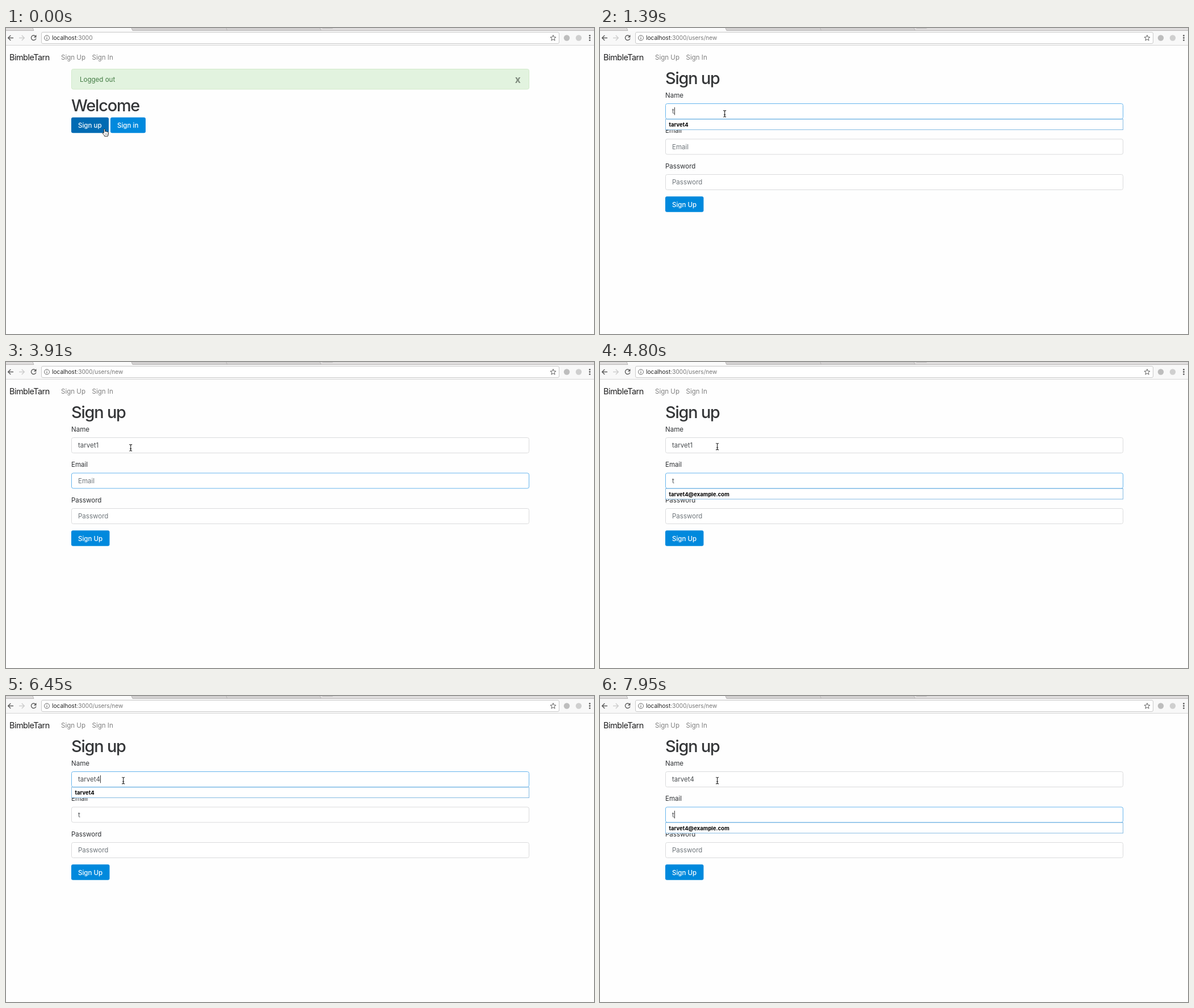
An HTML page that plays this animation: 1036 px wide and 540 px high, repeating every 8 s.

```html
<!DOCTYPE html>
<html lang="en">
<head>
<meta charset="utf-8">
<title>Sign up</title>
<style>
html, body { margin: 0; width: 100%; height: 100%; overflow: hidden; background: #fefefe; }
svg { display: block; width: 100vw; height: 100vh; }
text { font: 11.55px Inter, "Open Sans", sans-serif; fill: #2f3235; white-space: pre; }
.brand { font-size: 14.45px; letter-spacing: -.5px; fill: #1d1d1e; }
.nav { fill: #808080; }
.title { font-size: 28.9px; font-weight: 500; letter-spacing: -1.2px; fill: #343638; }
.btn { font-weight: 500; fill: #fff; }
.url { font-size: 10.15px; fill: #222; }
.path { fill: #777; }
.value { fill: #4a4e51; }
.hint { fill: #70777c; }
.option { font-size: 9.5px; font-weight: 700; fill: #000; }
.alert { fill: #417a42; }
.close { font-size: 17.3px; font-weight: 700; fill: #7f8b7e; }
</style>
</head>
<body>
<svg id="stage" viewBox="0 0 1036 540" preserveAspectRatio="none"></svg>
<script>
const NS = 'http://www.w3.org/2000/svg';
const stage = document.getElementById('stage');
const LOOP = 8000;

function add(parent, tag, attrs, content) {
  const el = document.createElementNS(NS, tag);
  for (const key in attrs) el.setAttribute(key, attrs[key]);
  if (content) el.textContent = content;
  parent.appendChild(el);
  return el;
}
const group = parent => add(parent, 'g', {});
const rect = (parent, x, y, width, height, fill, more) =>
  add(parent, 'rect', { x, y, width, height, fill, ...more });
const text = (parent, x, y, content, cls = '') =>
  add(parent, 'text', { x, y, class: cls }, content);
const stroke = (parent, d, color, width = 1.4) =>
  add(parent, 'path', { d, fill: 'none', stroke: color, 'stroke-width': width });
const dot = (parent, cx, cy, r, fill) => add(parent, 'circle', { cx, cy, r, fill });
const show = (el, on) => el.setAttribute('display', on ? 'inline' : 'none');

function button(parent, x, y, width, label, fill) {
  rect(parent, x, y, width, 27.5, fill, { rx: 3 });
  text(parent, x + 12, y + 18.3, label, 'btn');
}

// Browser bar
rect(stage, 0, 0, 1036, 540, '#fefefe');
rect(stage, 0, 0, 1036, 4, '#dfdddd');
add(stage, 'path', { d: 'M47 0H221L223 5H49Z', fill: '#fbfbfb' });
add(stage, 'path', { d: 'M221 0H553L555 4H223Z', fill: '#d2d0d0' });
stroke(stage, 'M0 4.5H49L47 0M221 0L223 4.5H1036M388 0L389.5 4M553 0L555 4', '#b9b7b7', 1);
rect(stage, 557, 0, 19, 1.2, '#c4c2c2', { rx: 1 });
rect(stage, 0, 5, 1036, 25, '#f8f8f8');
rect(stage, 0, 30, 1036, 1, '#d6d6d6');
rect(stage, 62.5, 7.5, 912, 20, '#fff', { rx: 2.5, stroke: '#c9c9c9' });
stroke(stage, 'M13 17.5H4M8.2 13L3.7 17.5L8.2 22', '#5c5c5c');
stroke(stage, 'M23 17.5H32M27.8 13L32.3 17.5L27.8 22', '#cdcdcd');
stroke(stage, 'M52 14.4A4.3 4.3 0 1 0 52.9 18.4', '#5c5c5c');
add(stage, 'path', { d: 'M53.5 12V16.7H48.8Z', fill: '#5c5c5c' });
add(stage, 'circle', { cx: 72, cy: 17.5, r: 4.5, fill: 'none', stroke: '#666', 'stroke-width': 1 });
stroke(stage, 'M72 16.8V20M72 14.7V15.8', '#666', 1.1);
const url = text(stage, 81, 21.2, 'localhost', 'url');
const path = add(url, 'tspan', { class: 'path' });
const star = Array.from({ length: 10 }, (_, i) => {
  const r = i % 2 ? 2.3 : 5.3, a = i * Math.PI / 5;
  return `${964 + r * Math.sin(a)} ${17.8 - r * Math.cos(a)}`;
});
stroke(stage, `M${star.join('L')}Z`, '#5f5f5f', 1);
dot(stage, 988, 17.5, 5.2, '#bdbdbd');
dot(stage, 1009, 17.5, 5.2, '#cfcfcf');
for (const y of [13.4, 17.5, 21.6]) dot(stage, 1028.5, y, 1.4, '#5a5a5a');

// Site header
text(stage, 6, 56.5, 'BimbleTarn', 'brand');
text(stage, 97, 56, 'Sign Up', 'nav');
text(stage, 151.5, 56, 'Sign In', 'nav');

// Welcome page
const welcome = group(stage);
rect(welcome, 115.5, 72.5, 806, 35.5, '#e2f3df', { rx: 3, stroke: '#d2eacb' });
text(welcome, 130, 94.5, 'Logged out', 'alert');
text(welcome, 896.8, 97, 'x', 'close');
text(welcome, 115, 147, 'Welcome', 'title');
button(welcome, 115, 157.8, 66, 'Sign up', '#006bb3');
button(welcome, 184, 157.8, 62, 'Sign in', '#0089dd');

// Sign-up form
const form = group(stage);
text(form, 115, 99, 'Sign up', 'title');
button(form, 115, 297.3, 67.5, 'Sign Up', '#0089dd');

function field(label, hint, y, option) {
  text(form, 115, y - 10.2, label);
  const box = rect(form, 115.5, y + .5, 806, 27, '#fff', { rx: 3 });
  const mark = rect(form, 127, y + 6.5, 0, 14.5, '#b3d7fe');
  const value = text(form, 127, y + 18, '');
  const caret = rect(form, 127, y + 7, 1, 13.5, '#333');
  let list;
  return {
    addList() {
      list = group(form);
      rect(list, 115.5, y + 28, 806, 18.5, '#fff', { stroke: '#86bbe2' });
      text(list, 121.5, y + 41.2, option, 'option');
    },
    draw(content, focus, caretOn, selected, open) {
      value.textContent = content || hint;
      value.setAttribute('class', content ? 'value' : 'hint');
      const width = content ? value.getComputedTextLength() : 0;
      box.setAttribute('stroke', ['#dadbdc', '#9cc8ec', '#66b5ee'][focus]);
      mark.setAttribute('width', selected ? width : 0);
      caret.setAttribute('x', 127 + Math.round(width));
      show(caret, caretOn);
      if (list) show(list, open);
    }
  };
}
const fields = [
  field('Name', 'User name', 133, 'tarvet4'),
  field('Email', 'Email', 195.5, 'tarvet4@example.com'),
  field('Password', 'Password', 258)
];
fields[0].addList();
fields[1].addList();

// Mouse pointers, each with its hot spot at 0,0
const pointers = { hand: group(stage), arrow: group(stage), beam: group(stage) };
add(pointers.hand, 'path', {
  d: 'M-1.2 .8C-1.2 -.6 1 -.6 1 .8V4.2C1.5 3.5 3 3.7 3.1 4.7C3.8 4 5 4.4 5.1 5.3C6 4.8 7 5.3 7 6.4V8.6C7 10.3 6 10.8 5.8 12.5H.2C0 10.8 -2.2 9.3 -3.2 7.3C-3.8 6 -2.4 5.5 -1.2 7Z',
  fill: '#fff', stroke: '#222', 'stroke-width': 1
});
stroke(pointers.hand, 'M1.4 7.5V10M3.3 7.5V10M5 7.5V10', '#444', .6);
add(pointers.arrow, 'path', {
  d: 'M0 0V10.2L2.3 8.1L4 12L5.9 11.2L4.2 7.4H7.3Z',
  fill: '#111', stroke: '#fff', 'stroke-width': .8
});
const beam = 'M-2.5 -5.7Q0 -5.7 0 -4.2Q0 -5.7 2.5 -5.7M0 -4.5V4.5M-2.5 5.7Q0 5.7 0 4.2Q0 5.7 2.5 5.7M-1.5 1.8H1.5';
stroke(pointers.beam, beam, '#fff', 2.2);
stroke(pointers.beam, beam, '#222', 1.1);

// Each step changes only the listed parts of the state.
const steps = [
  [0, { page: 'welcome', mouse: ['hand', 173.5, 178.5], name: '', email: '', active: -1, focus: 0, caret: false, selected: false, open: false }],
  [140, { page: 'form' }],
  [350, { mouse: ['arrow', 174, 178] }],
  [500, { mouse: ['arrow', 186, 169] }],
  [640, { mouse: ['beam', 212, 154] }],
  [790, { mouse: ['beam', 219.7, 151.3] }],
  [1090, { active: 0, focus: 1, caret: true }],
  [1240, { focus: 2 }],
  [1390, { name: 't', open: true }],
  [1830, { name: 'ta' }],
  [1980, { name: 'tar' }],
  [2130, { name: 'tarv' }],
  [2280, { name: 'tarve' }],
  [2420, { name: 'tarvet' }],
  [2860, { name: 'tarvet1' }],
  [3010, { open: false }],
  [3460, { active: 1, focus: 1 }],
  [3610, { focus: 2 }],
  [3910, { caret: false }],
  [4360, { email: 't', caret: true, open: true }],
  [4500, { mouse: ['beam', 214, 138] }],
  [4650, { mouse: ['beam', 206.7, 149.2] }],
  [4800, { caret: false }],
  [5100, { active: 0, focus: 1, selected: true, open: false }],
  [5250, { focus: 2 }],
  [5400, { selected: false, caret: true }],
  [5550, { caret: false }],
  [5850, { name: 'tarvet', caret: true, open: true }],
  [6300, { name: 'tarvet4' }],
  [6900, { open: false, caret: false }],
  [7350, { active: 1, focus: 1, selected: true }],
  [7500, { focus: 2 }],
  [7950, { selected: false, caret: true, open: true }]
];

function render(time) {
  const s = {};
  for (const [at, change] of steps) if (at <= time) Object.assign(s, change);
  const onForm = s.page === 'form';
  show(welcome, !onForm);
  show(form, onForm);
  path.textContent = onForm ? ':3000/users/new' : ':3000';
  [s.name, s.email, ''].forEach((content, i) => {
    const on = i === s.active;
    fields[i].draw(content, on ? s.focus : 0, on && s.caret, on && s.selected, on && s.open);
  });
  const [kind, x, y] = s.mouse;
  for (const key in pointers) show(pointers[key], key === kind);
  pointers[kind].setAttribute('transform', `translate(${x} ${y})`);
}

const start = performance.now();
function tick() {
  render((performance.now() - start) % LOOP);
  requestAnimationFrame(tick);
}
tick();
</script>
</body>
</html>
```
